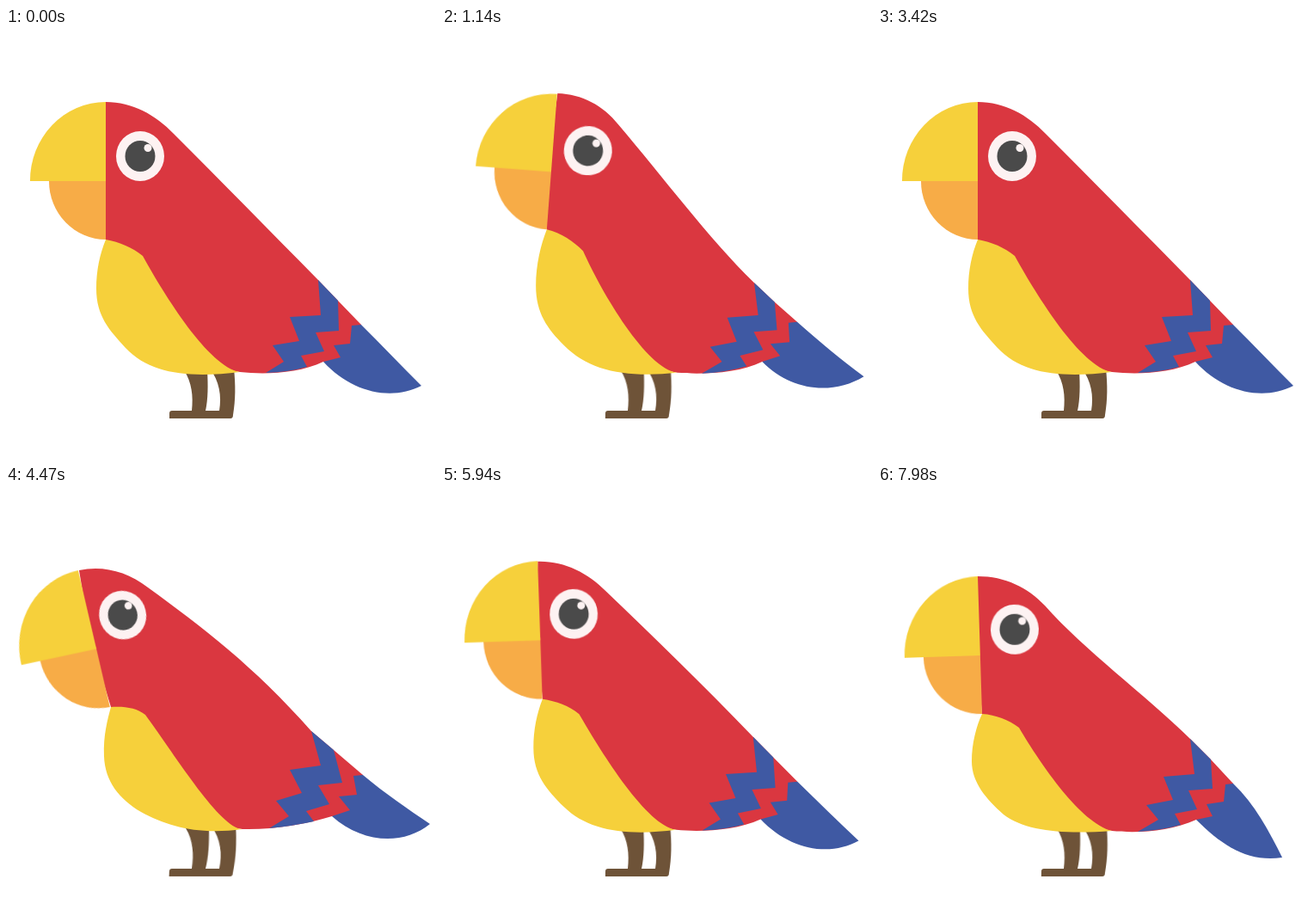
Animation of 500x500 px, one loop 8 s. Source, as an HTML page without scripts:

```html
<!DOCTYPE html>
<html lang="en">
<head>
<meta charset="utf-8">
<title>Parrot</title>
<style>
html, body { margin: 0; width: 100%; height: 100%; overflow: hidden; background: #fff; }
svg { display: block; width: 100%; height: 100%; }

/* Each part defines four poses: rest, look up, peck down, crouch. */
.morph, .pose { animation: 8s cubic-bezier(.37, 0, .63, 1) infinite; }
.morph { animation-name: morph; }
.pose { animation-name: pose; }

@keyframes morph {
  0%, 22.5%, 42.5%, 80% { d: var(--rest); }
  11.25% { d: var(--up); }
  56%, 57.5% { d: var(--down); }
  91.9% { d: var(--rest); animation-timing-function: cubic-bezier(.333, 0, .667, .333); }
  99.75%, 100% { d: var(--crouch); }
}
@keyframes pose {
  0%, 22.5%, 42.5%, 80% { transform: var(--rest); }
  11.25% { transform: var(--up); }
  56%, 57.5% { transform: var(--down); }
  91.9% { transform: var(--rest); animation-timing-function: cubic-bezier(.333, 0, .667, .333); }
  99.75%, 100% { transform: var(--crouch); }
}

.red { fill: #da3740; }
.yellow { fill: #f6d03b; }
.orange { fill: #f7ac47; }
.blue { fill: #3f59a3; }
.brown { fill: #6e5338; }

.legs {
  transform-origin: 0 445px;
  --rest: skewX(0deg);
  --up: skewX(-1deg);
  --down: skewX(-2.5deg);
  --crouch: skewX(-1deg);
}
.tail {
  --rest: path("M413 345C436 368 460 393 483 416C448 434 402 424 369 388L390 335Z");
  --up: path("M413 341C438 363 466 385 492 403C455 426 407 422 373 388L390 332Z");
  --down: path("M415 336C440 357 468 376 493 393C462 418 415 416 379 384L390 327Z");
  --crouch: path("M413 346C438 370 454 400 470 432C430 438 400 418 370 388L390 336Z");
}
.body {
  --rest: path("M116 86C147 86 174 101 195 123C250 178 307 236 363 293L386 317L413 345L402 346L400 367L381 369L389 383L369 388C340 402 300 403 272 400L215 390L116 246Q110 166 116 86Z");
  --up: path("M138 74C166 75 190 88 207 110C260 174 308 243 363 297L387 319L413 341L403 342L405 365L382 367L394 381L373 388C346 402 300 403 274 401L215 390L123 232Q124 153 138 74Z");
  --down: path("M85 98C112 92 141 99 165 118C228 164 288 209 355 285L381 307L415 336L404 337L408 359L387 361L400 377L379 384C350 393 310 400 275 399L215 390L122 257Q96 178 85 98Z");
  --crouch: path("M116 105C148 105 174 118 194 139C240 191 309 241 363 294L387 318L413 346L404 347L402 367L382 370L389 384L370 388C340 402 300 404 272 401L215 390L121 265Q112 185 116 105Z");
}
.band {
  --rest: path("M363 293L386 317L387 352L360 354L370 376L343 381L350 394Q330 400 302 401L323 388L310 369L341 364L330 336L366 334Z");
  --up: path("M363 297L387 319L390 351L363 353L374 374L347 381L355 393Q332 400 302 402L326 388L312 371L343 365L332 337L368 334Z");
  --down: path("M355 285L381 307L391 345L363 348L376 370L349 378L358 390Q336 395 306 398L329 384L314 366L344 357L330 330L366 325Z");
  --crouch: path("M363 294L387 318L389 352L361 354L371 376L345 381L352 394Q332 400 302 402L326 388L312 371L343 365L332 338L368 335Z");
}
.belly {
  --rest: path("M116 246C132 249 147 255 159 265C185 312 236 394 272 400C215 407 168 403 139 372C120 351 105 335 105 303C105 282 109 263 116 246Z");
  --up: path("M123 232C140 236 154 247 165 258C187 309 238 396 274 401C214 407 172 398 143 369C123 349 110 331 110 299C110 274 116 250 123 232Z");
  --down: path("M122 257C138 256 152 258 162 266C200 318 249 398 275 399C224 406 188 396 157 379C132 364 115 344 114 314C113 290 118 272 122 257Z");
  --crouch: path("M121 265C137 266 152 272 164 281C190 325 236 392 272 401C218 405 172 402 146 382C126 364 109 345 109 320C109 300 114 280 121 265Z");
}
.head {
  transform-origin: 116px 246px;
  --rest: translate(0, 0) rotate(0deg) skewY(0deg) scale(1, 1);
  --up: translate(7px, -14px) rotate(5.2deg) skewY(0deg) scale(1, .985);
  --down: translate(5px, 11px) rotate(-13.1deg) skewY(1deg) scale(1.015, 1.02);
  --crouch: translate(5px, 19px) rotate(-1.8deg) skewY(0deg) scale(1, 1);
}
.eye {
  transform-origin: 156px 149px;
  --rest: translate(0, 0) scale(1);
  --up: translate(1px, 1px) scale(1);
  --down: translate(-2px, -2.5px) scale(.96);
  --crouch: translate(1px, 0) scale(1);
}
</style>
</head>
<body>
<svg viewBox="0 0 500 500">
  <path class="legs pose brown" d="M207 398C216 412 218 428 216 445H193Q190 445 190 448V454H261Q264 454 264 450C267 432 267 415 265 396H237C248 410 251 428 248 445H232C235 432 235 415 234 398Z"/>
  <path class="tail morph blue"/>
  <path class="body morph red"/>
  <path class="band morph blue"/>
  <path class="belly morph yellow"/>
  <g class="head pose">
    <path class="orange" d="M116 175H50V178A66 68 0 0 0 116 246Z"/>
    <path class="yellow" d="M116 86A88 91.5 0 0 0 28 178H116Z"/>
    <g class="eye pose">
      <ellipse cx="156" cy="149" rx="28" ry="29" fill="#fdf2f2"/>
      <ellipse cx="156" cy="149" rx="17.5" ry="18" fill="#4a4a4a"/>
      <circle cx="165" cy="139.5" r="4.5" fill="#fdf2f2"/>
    </g>
  </g>
</svg>
</body>
</html>
```
